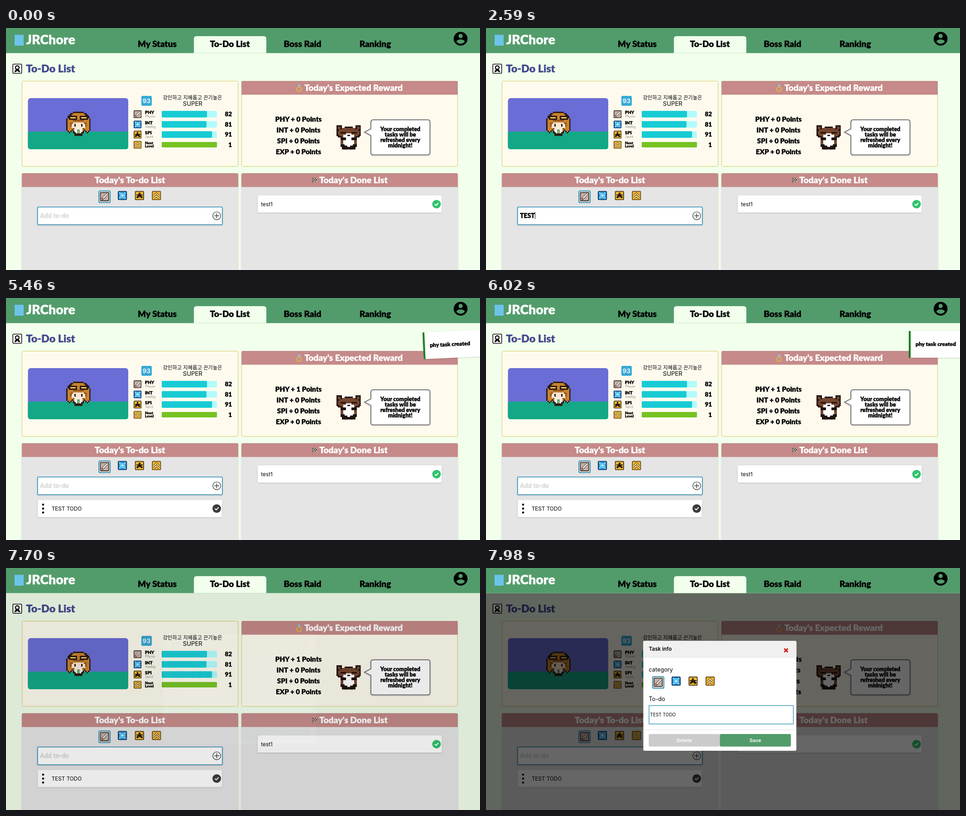
An HTML page for the animation above (8 s loop, 1047 by 535 pixels).

```html
<!DOCTYPE html>
<html lang="en">
<head>
<meta charset="utf-8">
<title>To-Do List</title>
<style>
  html, body { margin: 0; width: 100%; height: 100%; overflow: hidden; background: #f1ffec; }
  svg { display: block; width: 100%; height: 100%; }
  text { font-family: Inter, "Liberation Sans", sans-serif; white-space: pre; }
  .round { font-family: Lato, "Open Sans", sans-serif; font-weight: 900; stroke: currentColor; stroke-width: .4; stroke-linejoin: round; }
  .ko { font-family: "Noto Sans CJK KR", "Noto Sans CJK", sans-serif; font-weight: 500; }
  .mid { text-anchor: middle; }
  .end { text-anchor: end; }
  .bold { font-weight: 600; }
  .shadow { filter: drop-shadow(0 1px 1.5px rgba(0, 0, 0, .18)); }
</style>
</head>
<body>
<svg id="stage" viewBox="0 0 1047 535" preserveAspectRatio="none"></svg>
<script>
const GREEN = '#529c6b', ROSE = '#c58a89', BLUE = '#2f8fb8', PAGE = '#f1ffec';
const LOOP = 8000;
const STATS = ['phy', 'int', 'spi', 'exp'];

// Markup helpers
const rect = (x, y, w, h, fill, more = '') =>
  `<rect x="${x}" y="${y}" width="${w}" height="${h}" fill="${fill}" ${more}/>`;
const circle = (x, y, r, fill, more = '') =>
  `<circle cx="${x}" cy="${y}" r="${r}" fill="${fill}" ${more}/>`;
const path = (d, fill, more = '') => `<path d="${d}" fill="${fill}" ${more}/>`;
const line = (d, color, width, more = '') =>
  path(d, 'none', `stroke="${color}" stroke-width="${width}" ${more}`);
const text = (x, y, size, str, cls = '', color = '#000', more = '') =>
  `<text x="${x}" y="${y}" font-size="${size}" class="${cls}" fill="${color}" color="${color}" ${more}>${str}</text>`;
const group = (body, more = '') => `<g ${more}>${body}</g>`;
const use = (id, x, y, size) => `<use href="#${id}" x="${x}" y="${y}" width="${size}" height="${size}"/>`;
const symbol = (id, size, body) => `<symbol id="${id}" viewBox="0 0 ${size} ${size}">${body}</symbol>`;

// Pixel art: an ellipse snapped to whole grid cells, and a mirrored pair of them
function disc(fill, cx, cy, rx, ry) {
  let d = '';
  for (let y = Math.floor(cy - ry); y < cy + ry; y++)
    for (let x = Math.floor(cx - rx); x < cx + rx; x++)
      if (((x + .5 - cx) / rx) ** 2 + ((y + .5 - cy) / ry) ** 2 <= 1) d += `M${x} ${y}h1v1h-1z`;
  return path(d, fill, 'shape-rendering="crispEdges"');
}
const pair = (fill, mid, dx, cy, rx, ry) =>
  disc(fill, mid - dx, cy, rx, ry) + disc(fill, mid + dx, cy, rx, ry);

function girl() {
  const dark = '#2b1b12', hair = '#c8832e', m = 9;
  return disc(dark, m, 7.5, 9, 7.8) + pair(dark, m, 6.5, 12, 2.6, 3.6) + disc(dark, m, 14.5, 4, 3.5) +
    disc(hair, m, 7.5, 8, 6.8) + pair(hair, m, 6.5, 12, 1.6, 2.6) +
    disc('#8d541c', m, 9.5, 6, 4) + disc('#fde6d4', m, 10.2, 5, 3) + disc(hair, m, 7.5, 4.6, 1) +
    pair(dark, m, 4, 4.5, 3.4, 2) + pair('#f3c35d', m, 4, 4.5, 2.4, 1) +
    pair(dark, m, 2.5, 10, .6, 1.1) +
    disc('#f5f0e6', m, 14.2, 3, 2) + disc('#7fa878', m, 14.5, 1.2, 2) + pair(dark, m, 2, 17, 1, .9);
}

function bear() {
  const dark = '#20130f', fur = '#74462f', m = 9;
  return pair(dark, m, 7, 2, 2.2, 2.2) + disc(dark, m, 6, 9, 4.8) + disc(dark, m, 13, 6.5, 5) +
    pair(fur, m, 7, 2, 1.2, 1.2) + disc(fur, m, 5.5, 8, 3.8) + pair(dark, m, 4, 5.5, 2, .6) +
    disc('#fff', m, 8, 4, 1.8) + disc(dark, m, 7.5, 1.2, .6) +
    disc('#fff', m, 12.8, 4, 2.8) + pair(fur, m, 5, 12.5, 1, 1.6) + pair(dark, m, 3, 17, 2, .9);
}

const tile = (id, edge, face, mark) => symbol(id, 20,
  rect(0, 0, 20, 20, edge, 'rx="3"') + rect(1.7, 1.7, 16.6, 16.6, face, 'rx="1.5"') + mark);

function defs() {
  const chevrons = 'M4.5 11L10 5.5L15.5 11M4.5 16L10 10.5L15.5 16';
  const ink = '#241a12', sky = '#8be6ff';
  return '<defs>' +
    tile('phy', '#33251f', '#c0b0a7',
      line('M4 16L16 4', '#5a4440', 4.6) + line('M5 15L16 4', '#f4f1ee', 2.6) +
      line('M4 12L8 16', '#b74a3c', 1.8)) +
    tile('int', '#14365c', '#2585cc',
      [0, 90, 180, 270].map(a => rect(3, 3, 3, 3, sky, `transform="rotate(${a} 10 10)"`)).join('') +
      circle(10, 10, 5, '#46aee2', `stroke="${sky}" stroke-width="2" stroke-dasharray="3 1"`) +
      circle(10, 10, 2.4, '#d4f8ff')) +
    tile('spi', '#3a2a12', '#efb62e',
      disc(ink, 10, 6, 2.2, 2.2) + disc(ink, 10, 10.5, 4, 3.2) +
      pair(ink, 10, 5, 9, 2, 1.2) + pair(ink, 10, 4.5, 14, 2.2, 2)) +
    tile('exp', '#5a3c12', '#f0b433',
      line(chevrons, '#704a10', 4.2) + line(chevrons, '#fff0a8', 1.9)) +
    symbol('girl', 18, girl()) + symbol('bear', 18, bear()) + '</defs>';
}

function picker() {
  return rect(205.2, 360.2, 25, 26, '#dcd9d6', `rx="3" stroke="${BLUE}" stroke-width="1.8"`) +
    use('phy', 207.5, 362.8, 20.3) +
    STATS.slice(1).map((id, i) => use(id, 247 + 37.6 * i, 360.2, 20.3)).join('');
}

const tick = (x, y, fill) => circle(x, y, 9.5, fill) +
  line(`M${x - 4} ${y}l2.9 2.9l5.2 -5.6`, '#fff', 2);

function header() {
  const tabs = ['My Status', 'To-Do List', 'Boss Raid', 'Ranking'];
  const person = circle(12, 12, 10, '#000') + circle(12, 8, 3, GREEN) +
    path('M12 19.2c-2.5 0-4.7-1.3-6-3.2 0-2 4-3.1 6-3.1s6 1.1 6 3.1c-1.3 1.9-3.5 3.2-6 3.2z', GREEN);
  return rect(0, 0, 1047, 55.5, GREEN) +
    path('M415 55.5V24q0 -6 6 -6H569q6 0 6 6V55.5z', PAGE) +
    rect(19, 15, 20, 24, '#6cc4ea') +
    text(44.5, 35.6, 28.5, 'JRChore', 'round', '#fff') +
    tabs.map((n, i) => text(334 + 160.5 * i, 41.5, 19, n, 'round mid')).join('') +
    group(person, 'transform="translate(985.8 5.4) scale(1.53)"');
}

function heading() {
  return rect(15.2, 79.8, 19.4, 20.4, '#fff', 'rx="2" stroke="#111" stroke-width="1.6"') +
    circle(24.9, 87.5, 4, 'none', 'stroke="#111" stroke-width="2.4"') +
    path('M18 97.5l3.5 -6h6.8l3.5 6h-4l-2.9 -3l-2.9 3z', '#111') +
    text(44.2, 97.8, 23.4, 'To-Do List', 'round', '#434a8d');
}

function stat(i, name, sub, value, level) {
  const y = 190.5 + 22.5 * i, last = !sub, h = last ? 12 : 14.6;
  const label = last
    ? name.split(' ').map((s, n) => text(307, y - 1 + 7.2 * n, 8.2, s, 'round')).join('')
    : text(307, y - .3, 9.8, name, 'round') + text(307.5, y + 7.7, 7.3, sub, '', '#8b8b84');
  return use(STATS[i], 282, y - 8.6, 17.4) + label +
    rect(344, y - h / 2, 122, h, '#b2fbfd', 'rx="1.5"') +
    rect(344, y - h / 2, 122 * level, h, last ? '#75c322' : '#17cbd4', 'rx="2"') +
    text(499, y + 4.6, 13.4, value, 'round end');
}

const card = x => rect(x, 117.5, 477, 188.5, '#fefbee', 'rx="3" stroke="#dcc75c"');

function profile() {
  return card(35.5) +
    rect(48.5, 155, 221.5, 113, '#6a6dd5', 'rx="6"') +
    path('M48.5 229H270V262q0 6 -6 6H54.5q-6 0 -6 -6z', '#13a886') +
    use('girl', 132.5, 184.5, 54) +
    rect(299, 150, 23, 22, '#38a8d6', 'rx="3"') +
    text(310.5, 166, 13.6, '93', 'mid bold', '#fff') +
    text(412, 158.2, 11.3, '강인하고 지혜롭고 끈기높은', 'ko mid', '#000', 'lang="ko"') +
    text(412.3, 172, 13.2, 'SUPER', 'mid') +
    stat(0, 'PHY', 'Physic', 82, .82) + stat(1, 'INT', 'Intellig', 81, .81) +
    stat(2, 'SPI', 'Spirit', 91, .91) + stat(3, 'Next Level', '', 1, 1);
}

const bar = (x, y, w) => path(`M${x} ${y + 30.5}v-27.5q0 -3 3 -3h${w - 6}q3 0 3 3v27.5z`, ROSE);

function reward() {
  const talk = ['Your completed', 'tasks will be', 'refreshed every', 'midnight!'];
  return card(520.5) + bar(520, 117, 478) +
    circle(647.5, 135.4, 5, 'none', 'stroke="#e9b93c" stroke-width="2"') +
    path('M644.5 127l1.5 -2h3l1.5 2l-3 3.6z', '#7fd0ee') +
    text(659, 139.4, 19, "Today's Expected Reward", 'round', '#fff') +
    STATS.map((n, i) => text(646, 206.6 + 24 * i, 15.2, `${n.toUpperCase()} + 0 Points`,
      'round mid', '#000', `id="pts${i}"`)).join('') +
    use('bear', 729.5, 214.5, 54) +
    path('M811 203H931.5q5 0 5 5V275.5q0 5 -5 5H811q-5 0 -5 -5V237.5L792 230.3L806 223V208q0 -5 5 -5z',
      '#fff', 'stroke="#77787a" stroke-width="2" class="shadow"') +
    talk.map((s, i) => text(871, 227.8 + 12.1 * i, 12.5, s, 'round mid')).join('');
}

function flag(x, y) {
  let cells = rect(x, y, 10.4, 7.8, '#c9bdb9');
  for (let i = 0; i < 12; i++)
    if ((i + (i >> 2)) % 2 === 0) cells += rect(x + 2.6 * (i % 4), y + 2.6 * (i >> 2), 2.6, 2.6, '#4c4644');
  return cells + line(`M${x} ${y}v12`, '#6b625e', .9);
}

function task() {
  return rect(70.5, 446.5, 406.5, 38, '#fff', 'rx="2" class="shadow"') +
    [-1, 0, 1].map(k => circle(82, 465.5 + 8.7 * k, 2.3, '#000')).join('') +
    text(100.8, 470, 11.7, 'TEST TODO') + tick(465.5, 465.5, '#3c3c3e');
}

function lists() {
  const panel = x => rect(x, 321, 478, 230, '#e5e5e5', 'rx="3" class="shadow"') + bar(x, 321, 478);
  return panel(35) + panel(520) +
    text(273.7, 343.2, 19.5, "Today's To-do List", 'round mid', '#fff') +
    flag(677, 331.5) + text(692, 343.2, 19.2, "Today's Done List", 'round', '#fff') +
    picker() +
    rect(69.8, 395.7, 408, 39, '#fff', `rx="1.5" stroke="${BLUE}" stroke-width="1.6" class="shadow"`) +
    circle(465.5, 415.2, 8.7, 'none', 'stroke="#222" stroke-width="1.1"') +
    line('M460 415.2h11M465.5 409.7v11', '#222', 1.2) +
    text(75, 420, 14, '', 'round', '#000', 'id="entry"') +
    rect(75, 407, 1, 15.5, '#111', 'id="caret"') +
    rect(556, 370, 406.5, 38, '#fff', 'rx="2" class="shadow"') +
    text(563.3, 393.6, 11.8, 'test1') + tick(951, 389.4, '#2fc36c') +
    group(task(), 'id="task"');
}

const toast = () => group(
  rect(0, 0, 140, 59, '#fff', 'class="shadow"') + rect(0, 0, 4, 59, '#14801c') +
  text(15, 33, 12, 'phy task created', 'round'), 'id="toast"');

const button = (x, fill, label) => rect(x, 367, 157, 27.7, fill, 'rx="3"') +
  text(x + 78.5, 385, 11, label, 'mid bold', '#fff');

function modal() {
  return rect(347.5, 161, 338, 243, '#fff', 'rx="3"') +
    path('M347.5 197V164q0 -3 3 -3h332q3 0 3 3V197z', '#f0f0f0') +
    line('M347.5 197.3h338M347.5 357.7h338', '#dedede', 1) +
    text(359.8, 183.4, 11.5, 'Task info', 'bold') +
    line('M658.8 178l8 8M666.8 178l-8 8', '#d81212', 2.8) +
    text(359.5, 228.8, 12.7, 'category') + text(359.5, 294, 12.7, 'To-do') +
    group(picker(), 'transform="translate(162.7 -120.3)"') +
    rect(360.2, 304.2, 318.6, 40.6, '#fff', 'stroke="#3f9bc0" stroke-width="1.5"') +
    text(362.5, 328, 10, 'TEST TODO') +
    button(359.5, '#cbcbcb', 'Delete') + button(516.5, GREEN, 'Save');
}

const overlay = () => group(
  rect(0, 55.5, 1047, 479.5, '#000', 'opacity=".6"') + group(modal(), 'id="modal"'), 'id="overlay"');

const stage = document.getElementById('stage');
stage.innerHTML = defs() + rect(0, 0, 1047, 535, PAGE) + heading() + profile() + reward() +
  lists() + toast() + overlay() + header();

const [entry, caret, row, note, layer, dialog, points] =
  ['entry', 'caret', 'task', 'toast', 'overlay', 'modal', 'pts0'].map(id => document.getElementById(id));
const show = (node, on) => node.setAttribute('visibility', on ? 'visible' : 'hidden');
const clamp = v => Math.max(0, Math.min(1, v));

// The CSS "ease" curve, solved by bisection
function ease(x) {
  const curve = (a, b, u) => 3 * a * u * (1 - u) ** 2 + 3 * b * u * u * (1 - u) + u ** 3;
  let lo = 0, hi = 1;
  for (let i = 0; i < 20; i++) {
    const u = (lo + hi) / 2;
    if (curve(.25, .25, u) < x) lo = u; else hi = u;
  }
  return curve(.1, 1, hi);
}

const TYPED = 'TEST TODO';
const KEYS = [1960, 2240, 2520, 2590, 3080, 3430, 3500, 3710, 3850];
const FOCUS = 170, BLINK = 530, ENTER = 5250, CREATED = 5390;
const TOAST_IN = 5444, TOAST_OUT = 7490, MODAL_IN = 7664;

function drawEntry(t) {
  const pressed = KEYS.filter(k => k <= t);
  const sent = t >= CREATED;
  const typed = sent ? '' : TYPED.slice(0, pressed.length);
  const color = typed ? '#000' : '#dcdcdc';
  entry.textContent = typed || 'Add to-do';
  entry.setAttribute('fill', color);
  entry.setAttribute('color', color);
  const idle = t - (pressed.pop() || FOCUS);
  caret.setAttribute('x', 75 + (typed ? entry.getComputedTextLength() : 0));
  show(caret, t < ENTER && idle >= 0 && Math.floor(idle / BLINK) % 2 === 0);
  show(row, sent);
  points.textContent = `PHY + ${sent ? 1 : 0} Points`;
}

function drawToast(t) {
  const p = clamp((t - TOAST_IN) / 580);
  const angle = -5 * (1 - p) * Math.sin(6 * Math.PI * p);
  note.setAttribute('transform', `translate(${934 + 5 * angle} 73) rotate(${angle} 70 29.5)`);
  show(note, t >= TOAST_IN && t < TOAST_OUT);
}

function drawModal(t) {
  const e = ease(clamp((t - MODAL_IN) / 300));
  layer.setAttribute('opacity', e);
  dialog.setAttribute('opacity', e);
  dialog.setAttribute('transform', `translate(0 ${-17.5 * (1 - e)})`);
  show(layer, t > MODAL_IN);
}

const start = performance.now();
function frame() {
  const t = (performance.now() - start) % LOOP;
  drawEntry(t);
  drawToast(t);
  drawModal(t);
  requestAnimationFrame(frame);
}
frame();
</script>
</body>
</html>
```
